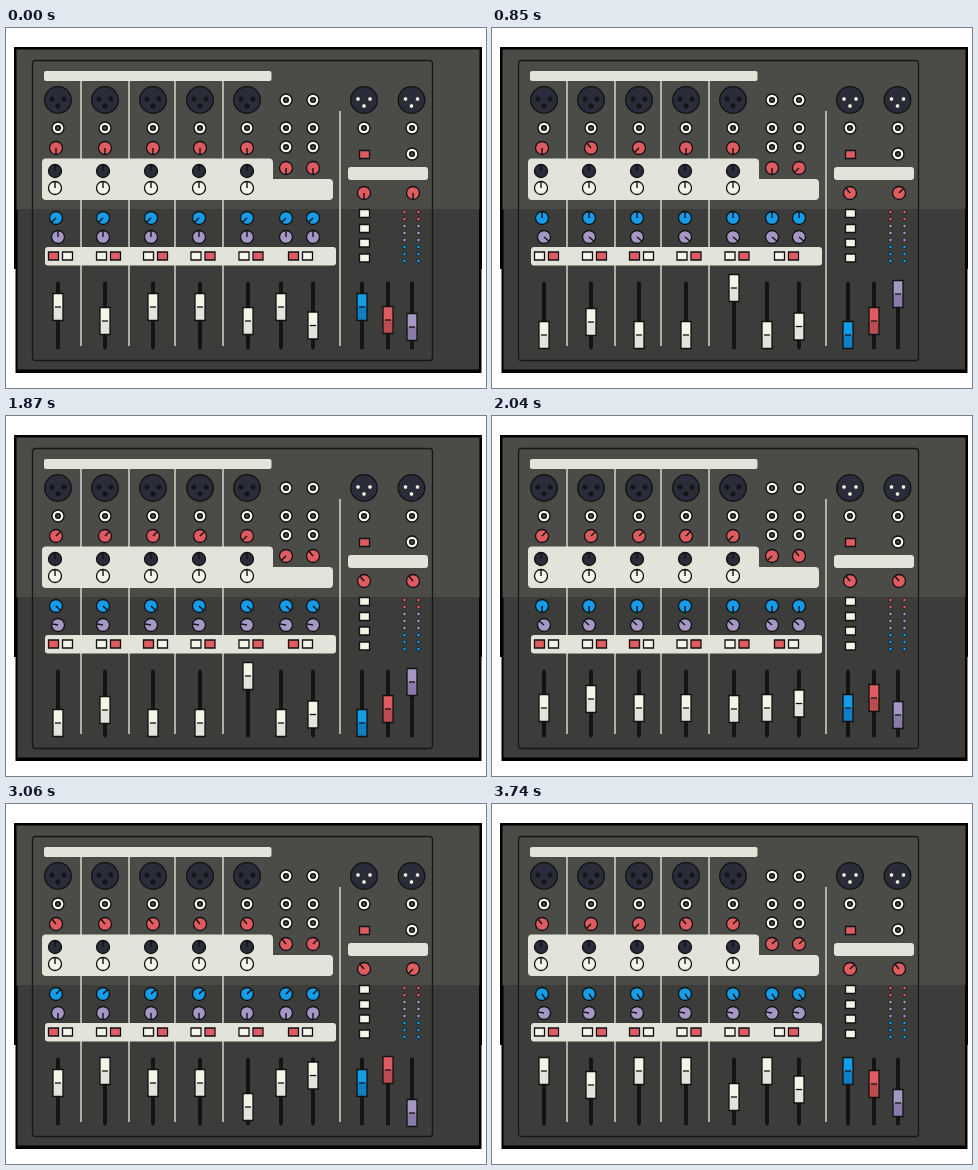
Write an HTML page with a canvas that moves like this. It is 480 by 360 pixels and loops after 4.08 s.

```html
<!DOCTYPE html>
<html>
<head>
<meta charset="utf-8">
<style>
  html, body { margin: 0; width: 100%; height: 100%; overflow: hidden; background: #fff; }
  canvas { display: block; }
</style>
</head>
<body>
<canvas id="stage" width="480" height="360"></canvas>
<script>
const ctx = document.getElementById('stage').getContext('2d');
const LOOP = 4080, TICK = 170;
const INK = '#111112', CREAM = '#f3f5e6', PANEL = '#e3e3d9';
const RED = '#de5c5f', BLUE = '#159ce8', PURPLE = '#a597c4', NAVY = '#2b2c3a';

const channels = [52, 99, 147, 194, 241];
const knobColumns = [97, 145, 193, 241, 280, 307];
const redKnobs = [[50, 120], [99, 120], [147, 120], [194, 120], [241, 120],
  [280, 140], [307, 140], [358, 165], [407, 165]];
const headings = { D: 180, L: 225, U: -40, R: 45 };

// Hard steps: [start in ms, value]
const redSteps = [[0, 'DDDDDDDDD'], [680, 'DULDDDLUR'], [1360, 'RRRRLLUUU'],
  [2380, 'LURLUUUUU'], [2890, 'UUUUUURUL'], [3400, 'ULLURRRRU']];
// Heights of the three fader groups
const faderSteps = [[0, [279, 293, 293]], [340, [296, 308, 271]], [850, [307, 294, 260]],
  [2040, [292, 283, 293]], [2720, [279, 267, 303]], [3400, [267, 281, 293]]];
const outerButtons = [[0, 0], [510, 1], [1360, 0], [3400, 1]];
const thirdButton = [[0, 1], [850, 0], [2720, 1], [3400, 0]];
// Two turns per loop: [tick, degrees]
const blueTurn = [[0, 225], [2, 300], [5, 360], [11, 495], [15, 670], [18, 765], [22, 865], [24, 945]];
const purpleTurn = [[0, 0], [2, 45], [5, 130], [11, 280], [15, 405], [18, 540], [22, 640], [24, 720]];
const heldTicks = [1, 13, 17, 19, 21, 23];

// x, group, height offset, upper and lower colour
const faders = [
  [52, 0, 0], [99, 1, 0], [147, 0, 0], [194, 0, 0], [242, 2, 0], [275, 0, 0], [307, 1, 4.5],
  [356, 0, 0, BLUE, '#0d7fc4'], [382, 1, -1, RED, '#bd4c50'], [406, 2, 6, PURPLE, '#897ba9']];

const stepAt = (steps, t) => steps.filter(s => s[0] <= t).pop()[1];

function angleAt(keys, tick) {
  const i = keys.findIndex(k => k[0] > tick);
  const [a, from] = keys[i - 1], [b, to] = keys[i];
  return from + (to - from) * (tick - a) / (b - a);
}

function rect(x, y, w, h, fill, radius = 0, stroke) {
  ctx.beginPath();
  ctx.roundRect(x, y, w, h, radius);
  if (fill) { ctx.fillStyle = fill; ctx.fill(); }
  if (stroke) { ctx.strokeStyle = stroke; ctx.lineWidth = 1.3; ctx.stroke(); }
}

function disc(x, y, r, fill, outline = 0) {
  ctx.beginPath();
  ctx.arc(x, y, r, 0, Math.PI * 2);
  ctx.fillStyle = fill;
  ctx.fill();
  if (outline) { ctx.strokeStyle = INK; ctx.lineWidth = outline; ctx.stroke(); }
}

function line(x1, y1, x2, y2, color, width) {
  ctx.beginPath();
  ctx.moveTo(x1, y1);
  ctx.lineTo(x2, y2);
  ctx.strokeStyle = color;
  ctx.lineWidth = width;
  ctx.stroke();
}

function knob(x, y, color, degrees, r = 6.5) {
  const a = degrees * Math.PI / 180;
  disc(x, y, r, color, 1.3);
  line(x, y, x + Math.sin(a) * r, y - Math.cos(a) * r, INK, 1.4);
}

function jack(x, y) {
  disc(x, y, 6, CREAM, 1.3);
  disc(x, y, 2.3, '#55554f', 1.5);
}

function socket(x, pin) {
  disc(x, 72, 13.3, NAVY, 1.3);
  for (const [dx, dy] of [[-6, -1], [6, -1], [0, 6]]) disc(x + dx, 72 + dy, 2.2, pin, 0.6);
}

function button(x, y, color) {
  rect(x - 5, y - 4, 10, 8, color, 0, INK);
}

function drawBoard() {
  rect(0, 0, 480, 360, '#fff');
  rect(8, 19, 468, 222, '#000');
  rect(9.5, 200, 466, 145, '#000');
  rect(10.5, 21.5, 463, 160, '#4b4b48');
  rect(11.5, 181, 461.5, 160.5, '#3c3c3a');
  rect(26.5, 32.5, 400, 300, null, 3, '#171717');

  for (const x of [75, 123, 169, 217]) line(x, 50, x, 318, '#d6d6d0', 1.5);
  line(334, 83, 334, 318, '#d6d6d0', 1.5);

  rect(38, 43, 227.5, 10, PANEL, 2);
  rect(36, 130.5, 231, 41.5, PANEL, 4);
  rect(250, 151, 77, 21, PANEL, 4);
  rect(39, 219, 291, 18.5, PANEL, 3);
  rect(342, 139, 80, 13, PANEL, 3);

  for (const x of channels) { socket(x, '#15151b'); jack(x, 100); }
  for (const x of [358, 405.5]) socket(x, CREAM);
  for (const x of [280, 307]) for (const y of [72, 100, 119]) jack(x, y);
  for (const [x, y] of [[358, 100], [406, 100], [406, 126]]) jack(x, y);
  for (const x of [49, 97, 145, 193, 241]) {
    knob(x, 143, NAVY, 0);
    knob(x, 160, CREAM, 0);
  }
  button(358.5, 126.5, RED);
  for (const y of [185.5, 200.5, 215, 230]) button(358.5, y, CREAM);
  for (let i = 0; i < 8; i++) {
    const color = i < 2 ? RED : i < 5 ? PURPLE : BLUE;
    for (const x of [398.5, 412.5]) disc(x, 184 + i * 7, 1.8, color, 0.7);
  }
}

function drawFader([x, group, offset, upper = CREAM, lower = '#e3e3db'], heights) {
  const y = heights[group] + offset;
  ctx.lineCap = 'round';
  line(x, 255.5, x, 319.5, '#141414', 4);
  ctx.lineCap = 'butt';
  rect(x - 5, y - 13.5, 10, 13.5, upper);
  rect(x - 5, y, 10, 13.5, lower);
  rect(x - 5, y - 13.5, 10, 27, null, 0, INK);
  line(x - 3, y, x + 3, y, INK, 1.3);
}

function drawControls(t) {
  const reds = stepAt(redSteps, t);
  redKnobs.forEach(([x, y], i) => knob(x, y, RED, headings[reds[i]]));

  let tick = Math.floor(t / TICK);
  if (heldTicks.includes(tick)) tick--;
  const blue = angleAt(blueTurn, tick), purple = angleAt(purpleTurn, tick);
  for (const x of [50, ...knobColumns]) knob(x, 190, BLUE, blue);
  for (const x of [52, ...knobColumns]) knob(x, 209, PURPLE, purple);

  const outer = stepAt(outerButtons, t), third = stepAt(thirdButton, t);
  [outer, 1, third, 1, 1, outer].forEach((right, i) => {
    const x = [47.5, 95.5, 142.5, 190, 238, 287.5][i];
    button(x, 228, right ? CREAM : RED);
    button(x + 14, 228, right ? RED : CREAM);
  });

  const heights = stepAt(faderSteps, t);
  for (const fader of faders) drawFader(fader, heights);
}

const start = performance.now();
function render() {
  drawBoard();
  drawControls((performance.now() - start) % LOOP);
  requestAnimationFrame(render);
}
render();
</script>
</body>
</html>
```
